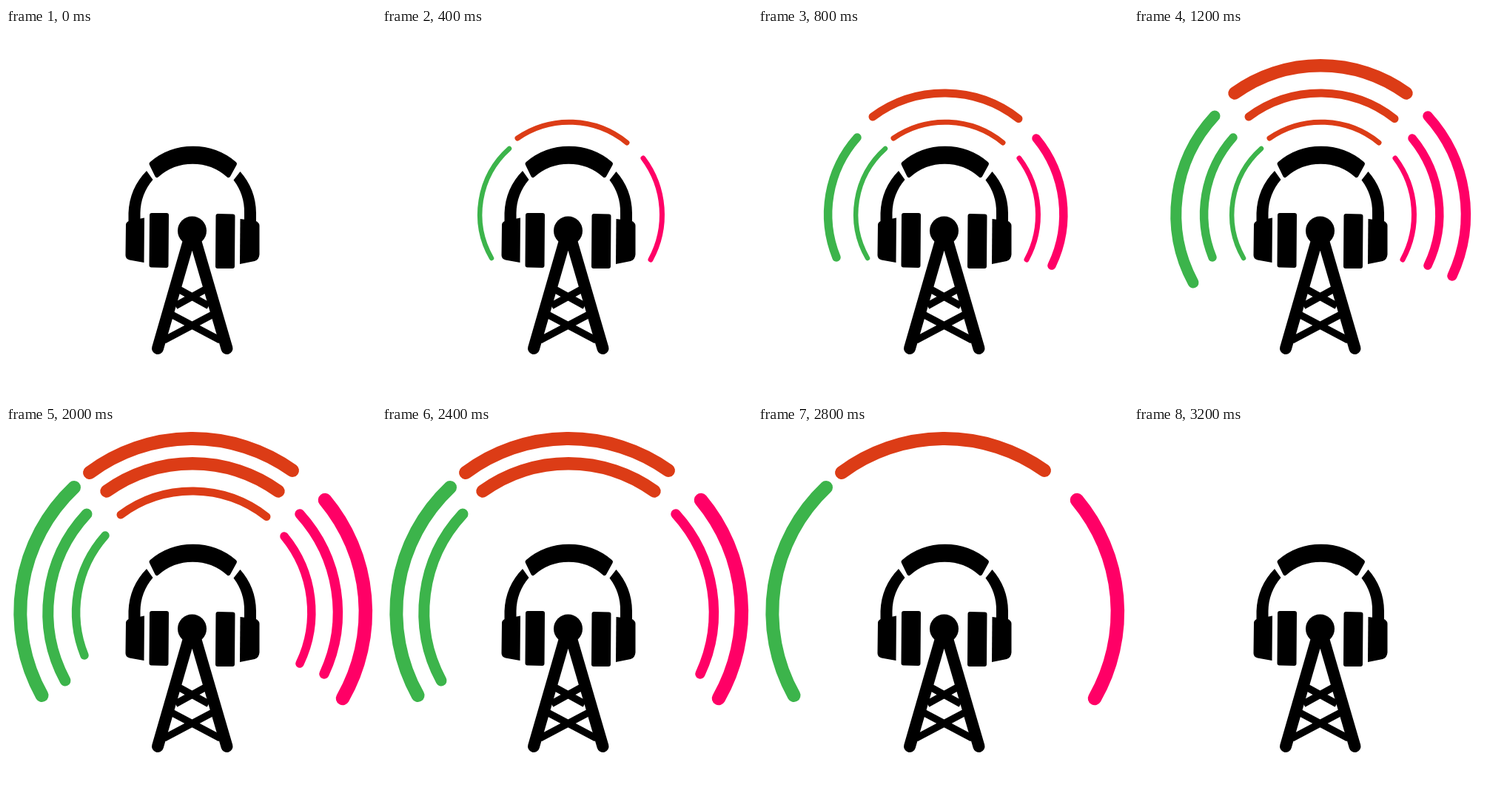
An HTML page that plays this animation: 500 by 500 pixels, repeating every 3600 ms.

```html
<!DOCTYPE html>
<html lang="en">
<head>
<meta charset="utf-8">
<title>Radio waves</title>
<style>
  html, body { margin: 0; width: 100%; height: 100%; overflow: hidden; background: #fff; }
  svg { display: block; width: 100vw; height: 100vh; }
  .wave { fill: none; stroke-linecap: round; opacity: 0; }
  .rounded { stroke: #000; stroke-width: 6; stroke-linejoin: round; }
  .tower { fill: none; stroke: #000; stroke-linejoin: round; }
</style>
</head>
<body>
<svg viewBox="0 0 500 500">
  <g id="waves"></g>

  <!-- headband -->
  <path class="rounded" d="M196.500 183.500A87 87 0 0 1 309 183.500L300.500 199A73 73 0 0 0 204 199Z"/>
  <path d="M190 193L198.500 205A71 71 0 0 0 181.500 250V262H165.500V250A86 86 0 0 1 190 193Z"/>
  <path d="M316.500 194L307.500 205.500A71 71 0 0 1 322 250V262H338V250A86 86 0 0 0 316.500 194Z"/>

  <!-- ear cups -->
  <path d="M167 260.500L187 256.500L186.500 317L167 313.500Q161.500 312 161.500 307L162 266Q162 262 167 260.500Z"/>
  <path d="M316.500 258L337 260.500Q342.500 263 342.500 267V306Q342 313 336 315L316 319Z"/>
  <path class="rounded" d="M197 253L217 253L216.500 321L196.500 320.500Z"/>
  <path class="rounded" d="M286.500 254L306.500 254.500L306 322L286 322Z"/>

  <!-- tower -->
  <circle cx="251.500" cy="274" r="19.500"/>
  <path class="tower" stroke-width="16" stroke-linecap="round" d="M205 433L251.500 272L298.500 433"/>
  <path class="tower" stroke-width="9.500" d="M231.500 352L274 375.500M271.500 352L229 375.500M221.500 386L289.500 422M281.500 386L213.500 422"/>
</svg>
<script>
  const LOOP = 3600, STEP = 400;
  const RED = '#dc3c16', GREEN = '#3cb44b', PINK = '#ff0066';

  // Each wave: colour, start x y, end x y, radius, line width
  const rings = [
    [[RED, 183, 149, 331, 155, 123.5, 7], [GREEN, 148, 311, 172, 163, 119, 6.5], [PINK, 353, 176, 363, 313, 127, 7]],
    [[RED, 155, 120, 352, 122.5, 163, 11], [GREEN, 106, 310, 134, 148, 156, 11.5], [PINK, 376, 149, 397, 321, 161, 11.5]],
    [[RED, 136, 88, 368, 88, 199, 17.5], [GREEN, 80, 344, 109, 119, 195, 15], [PINK, 397, 119, 430, 335, 197.5, 13.5]],
    [[RED, 113, 63, 387, 60, 233.5, 18], [GREEN, 48.5, 364, 92, 83, 231.5, 18], [PINK, 431, 100, 455, 368, 236, 18.5]]
  ];

  function drawWave([color, x1, y1, x2, y2, r, width]) {
    const path = document.createElementNS('http://www.w3.org/2000/svg', 'path');
    path.setAttribute('class', 'wave');
    path.setAttribute('stroke', color);
    path.setAttribute('stroke-width', width);
    path.setAttribute('d', `M${x1} ${y1}A${r} ${r} 0 0 1 ${x2} ${y2}`);
    document.getElementById('waves').append(path);
    return path;
  }

  // Rings switch on one after another, then off in the same order
  rings.forEach((waves, i) => {
    const on = (i + 1) * STEP / LOOP;
    const off = (i + 5) * STEP / LOOP;
    const hold = (opacity, offset) => ({ opacity, offset, easing: 'step-end' });
    const frames = [hold(0, 0), hold(1, on), hold(0, off), hold(0, 1)];
    for (const wave of waves) {
      const anim = drawWave(wave).animate(frames, { duration: LOOP, iterations: Infinity });
      anim.startTime = 0;
    }
  });
</script>
</body>
</html>
```
